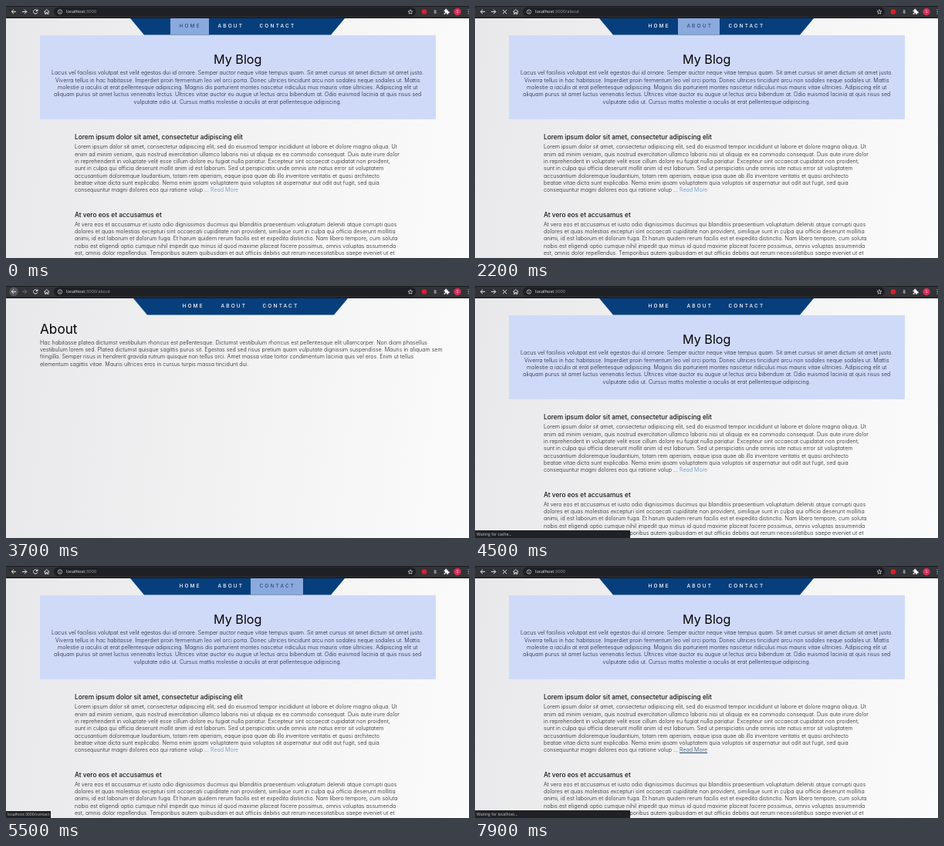
Recreate the animation shown at these times as an HTML page. Size 600x327 px, loop 8000 ms.

```html
<!DOCTYPE html>
<html lang="en">
<head>
<meta charset="utf-8">
<title>My Blog</title>
<style>
  html, body { margin: 0; width: 100%; height: 100%; overflow: hidden; }
  body {
    position: relative;
    background: linear-gradient(97deg, #e8e8ea, #f1f1f2 45%, #fbfbfb);
    font: 300 7.1px/9.35px Inter, sans-serif;
    font-feature-settings: "cv11";
    color: #242428;
  }
  section, section *, nav, nav *, .bar, .url, .url i, .tip, .tip span { position: absolute; margin: 0; white-space: pre; }
  p .more { position: static; }

  /* browser bar */
  .bar { left: 0; top: 0; width: 600px; height: 16px; white-space: normal; }
  .bar svg { display: block; }
  .url, .tip { font: 400 5.8px/8px "Open Sans", sans-serif; font-feature-settings: normal; }
  .url { left: 78px; top: 3.2px; color: #9a9ca0; }
  .url b { font-weight: 400; color: #f1f1f1; }
  .url i { left: 100%; top: 0; font-style: normal; }

  /* page */
  .page { left: 0; top: 0; width: 600px; height: 327px; }
  .hero { left: 44px; top: 38px; width: 512.5px; height: 109px; background: #cfdaf9; }
  .hero h1 { left: 0; width: 100%; top: 21px; text-align: center; }
  .hero p { left: 0; width: 100%; top: 44.2px; text-align: center; }
  h1 { font: 400 16.2px/20px Inter, sans-serif; color: #050505; }
  h1.wide { font-size: 17.2px; }
  h2 { left: 89px; font: 500 8.35px/10px Inter, sans-serif; color: #161618; }
  .post { left: 89px; }
  .wide { left: 44px; }
  .more { color: #5a8fc6; }

  nav {
    left: 161px; top: 16px; width: 278px; height: 21.5px;
    font: 500 6.5px/21.4px Inter, sans-serif; letter-spacing: 2.2px; color: #fff;
  }
  nav::before {
    content: ""; position: absolute; inset: 0; background: #063f7c;
    clip-path: polygon(0 0, 100% 0, 260px 100%, 18px 100%);
  }
  nav b, nav i { top: 0; height: 21px; font-weight: 500; font-style: normal; text-indent: 11.4px; }
  nav i { background: #8aa9dd; color: #1c3d70; font-weight: 400; }
  .n1 { left: 52px; width: 50px; }
  .n2 { left: 102px; width: 54px; }
  .n3 { left: 156px; width: 68px; }

  /* status bubbles */
  .tip { left: 0; bottom: 0; height: 9px; padding: 0 2px; font-size: 5.15px; line-height: 9px; background: #202124; color: #c8c9cc; }
  .wait { width: 197px; height: 10px; line-height: 10px; }
  .wait span { left: 2px; }

  /* timeline: 1% = 80ms */
  .cut { animation: 8s step-end infinite; }
  .fade { animation: 8s linear infinite; }

  .home { animation-name: home; }
  @keyframes home { 0%, 48.75%, 85% { opacity: 1 } 28.75%, 75% { opacity: 0 } }
  .about { animation-name: about; }
  @keyframes about { 0%, 48.75% { opacity: 0 } 28.75% { opacity: 1 } }
  .contact { animation-name: contact; }
  @keyframes contact { 0%, 85% { opacity: 0 } 75% { opacity: 1 } }
  nav.cut { animation-name: shift; }
  @keyframes shift { 0%, 48.75%, 85% { transform: none } 28.75%, 75% { transform: translateX(4px) } }
  .next { animation-name: next; }
  @keyframes next { 0%, 48.75%, 85% { opacity: 1 } 28.75%, 75% { opacity: .35 } }
  .load { animation-name: load; }
  @keyframes load {
    0%, 13.75%, 28.75%, 60%, 76.25% { opacity: 0 }
    6.25%, 25%, 48.75%, 73.75%, 93.75% { opacity: 1 }
  }
  .back { animation-name: back; }
  @keyframes back {
    0%, 43.75%, 50%, 82.5%, 85%, 100% { opacity: 0 }
    45%, 48.75%, 83.5%, 84% { opacity: 1 }
  }
  .u1 { animation-name: path1; }
  @keyframes path1 { 0%, 47.5% { opacity: 0 } 25% { opacity: 1 } }
  .u2 { animation-name: path2; }
  @keyframes path2 { 0%, 83.75% { opacity: 0 } 73.75% { opacity: 1 } }

  i.n1 { animation-name: over1; }
  @keyframes over1 { 0%, 11.25% { opacity: 1 } 15%, 100% { opacity: 0 } }
  i.n2 { animation-name: over2; }
  @keyframes over2 { 0%, 20%, 42.5%, 100% { opacity: 0 } 23.75%, 37.5% { opacity: 1 } }
  i.n3 { animation-name: over3; }
  @keyframes over3 { 0%, 62.5%, 82.5%, 100% { opacity: 0 } 66.25%, 78.75% { opacity: 1 } }

  .wait { animation-name: wait; }
  @keyframes wait { 0%, 18.75%, 60% { opacity: 0 } 8.75%, 56.25%, 90% { opacity: 1 } }
  .cache { animation-name: cache; }
  @keyframes cache { 0%, 50% { opacity: 1 } 13.75%, 93.75% { opacity: 0 } }
  .host { animation-name: host; }
  @keyframes host { 0%, 50% { opacity: 0 } 13.75%, 93.75% { opacity: 1 } }
  .t1 { animation-name: tip1; }
  @keyframes tip1 { 0%, 25% { opacity: 0 } 21.25% { opacity: 1 } }
  .t2 { animation-name: tip2; }
  @keyframes tip2 { 0%, 73.75% { opacity: 0 } 65% { opacity: 1 } }
  .more { animation-name: more; }
  @keyframes more {
    0% { color: #5a8fc6; text-decoration: none }
    97.5% { color: #28486c; text-decoration: underline }
  }
</style>
</head>
<body>

<section class="page home cut">
  <div class="hero">
    <h1>My Blog</h1>
    <p>Lacus vel facilisis volutpat est velit egestas dui id ornare. Semper auctor neque vitae tempus quam. Sit amet cursus sit amet dictum sit amet justo.
Viverra tellus in hac habitasse. Imperdiet proin fermentum leo vel orci porta. Donec ultrices tincidunt arcu non sodales neque sodales ut. Mattis
molestie a iaculis at erat pellentesque adipiscing. Magnis dis parturient montes nascetur ridiculus mus mauris vitae ultricies. Adipiscing elit ut
aliquam purus sit amet luctus venenatis lectus. Ultrices vitae auctor eu augue ut lectus arcu bibendum at. Odio euismod lacinia at quis risus sed
vulputate odio ut. Cursus mattis molestie a iaculis at erat pellentesque adipiscing.</p>
  </div>
  <h2 style="top:164.5px">Lorem ipsum dolor sit amet, consectetur adipiscing elit</h2>
  <p class="post" style="top:178.3px">Lorem ipsum dolor sit amet, consectetur adipiscing elit, sed do eiusmod tempor incididunt ut labore et dolore magna aliqua. Ut
enim ad minim veniam, quis nostrud exercitation ullamco laboris nisi ut aliquip ex ea commodo consequat. Duis aute irure dolor
in reprehenderit in voluptate velit esse cillum dolore eu fugiat nulla pariatur. Excepteur sint occaecat cupidatat non proident,
sunt in culpa qui officia deserunt mollit anim id est laborum. Sed ut perspiciatis unde omnis iste natus error sit voluptatem
accusantium doloremque laudantium, totam rem aperiam, eaque ipsa quae ab illo inventore veritatis et quasi architecto
beatae vitae dicta sunt explicabo. Nemo enim ipsam voluptatem quia voluptas sit aspernatur aut odit aut fugit, sed quia
consequuntur magni dolores eos qui ratione volup ... <span class="more cut">Read More</span></p>
  <h2 style="top:265.5px">At vero eos et accusamus et</h2>
  <p class="post" style="top:278.6px">At vero eos et accusamus et iusto odio dignissimos ducimus qui blanditiis praesentium voluptatum deleniti atque corrupti quos
dolores et quas molestias excepturi sint occaecati cupiditate non provident, similique sunt in culpa qui officia deserunt mollitia
animi, id est laborum et dolorum fuga. Et harum quidem rerum facilis est et expedita distinctio. Nam libero tempore, cum soluta
nobis est eligendi optio cumque nihil impedit quo minus id quod maxime placeat facere possimus, omnis voluptas assumenda
est, omnis dolor repellendus. Temporibus autem quibusdam et aut officiis debitis aut rerum necessitatibus saepe eveniet ut et</p>
</section>

<section class="page about cut">
  <h1 class="wide" style="top:46px">About</h1>
  <p class="wide" style="top:68.7px">Hac habitasse platea dictumst vestibulum rhoncus est pellentesque. Dictumst vestibulum rhoncus est pellentesque elit ullamcorper. Non diam phasellus
vestibulum lorem sed. Platea dictumst quisque sagittis purus sit. Egestas sed sed risus pretium quam vulputate dignissim suspendisse. Mauris in aliquam sem
fringilla. Semper risus in hendrerit gravida rutrum quisque non tellus orci. Amet massa vitae tortor condimentum lacinia quis vel eros. Enim ut tellus
elementum sagittis vitae. Mauris ultrices eros in cursus turpis massa tincidunt dui.</p>
</section>

<section class="page contact cut">
  <h1 class="wide" style="top:46px">Contact</h1>
</section>

<nav class="cut"><b class="n1">HOME</b><b class="n2">ABOUT</b><b class="n3">CONTACT</b><i class="n1 fade">HOME</i><i class="n2 fade">ABOUT</i><i class="n3 fade">CONTACT</i></nav>

<div class="bar">
  <svg width="600" height="16" fill="none" stroke="#e8e8ea" stroke-width="1">
    <path d="M0 0H600V16H0Z" fill="#323337" stroke="none"/>
    <path d="M0 0H600V1H0ZM0 14.6H600V16H0Z" fill="#1b1c1f" stroke="none"/>
    <rect x="62" y="1.6" width="469" height="11.8" rx="5.9" fill="#1f2023" stroke="none"/>
    <circle class="back fade" cx="10" cy="7.4" r="5.8" fill="#56575c" stroke="none"/>
    <path d="M13 7.4H7.2M10 4.6L7.2 7.4L10 10.2"/>
    <path class="next cut" d="M21 7.4H26.8M24 4.6L26.8 7.4L24 10.2"/>
    <path d="M40.6 6A2.7 2.7 0 1 0 40.8 8.3M41 4.4V6.5H38.8"/>
    <g class="load cut">
      <path d="M34 3H43V12H34Z" fill="#323337" stroke="none"/>
      <path d="M36 5L41 10M41 5L36 10"/>
    </g>
    <path d="M49.4 7.6L52.8 4.5L56.2 7.6M50.6 7V10.4H52V8.4H53.6V10.4H55V7" stroke-width=".9"/>
    <g stroke-width=".7">
      <circle cx="70" cy="7.5" r="2.7"/>
      <path d="M70 7.1V9.1M70 5.7V6.4"/>
      <path d="M524 4.6L524.8 6.6L526.9 6.8L525.3 8.1L525.8 10.2L524 9.1L522.2 10.2L522.7 8.1L521.1 6.8L523.2 6.6Z"/>
    </g>
    <g stroke="none">
      <circle cx="542" cy="7.5" r="3.3" fill="#d9202c"/>
      <path d="M555 5H557.4V8H558.4L556.2 10.6L554 8H555Z" fill="#8d8e92"/>
      <path d="M567.6 5.5H569.3A1.2 1.2 0 1 1 571.3 5.5H573V7.2A1.2 1.2 0 1 1 573 9.2V10.8H571.2A1 1 0 1 0 569.4 10.8H567.6V9A1 1 0 1 0 567.6 7.2Z" fill="#f2f2f2"/>
      <circle cx="585" cy="7.5" r="4.7" fill="#dc2d5b"/>
      <text x="585" y="9.3" text-anchor="middle" fill="#fff" font-family="Roboto, sans-serif" font-size="5">S</text>
      <path d="M598.6 4.6h1v1h-1zM598.6 7h1v1h-1zM598.6 9.4h1v1h-1z" fill="#e8e8ea"/>
    </g>
  </svg>
  <div class="url"><b>localhost</b>:3000<i class="u1 cut">/about</i><i class="u2 cut">/contact</i></div>
</div>

<div class="tip wait cut"><span class="cache cut">Waiting for cache...</span><span class="host cut">Waiting for localhost...</span></div>
<div class="tip t1 cut">localhost:3000/about</div>
<div class="tip t2 cut">localhost:3000/contact</div>

</body>
</html>
```
